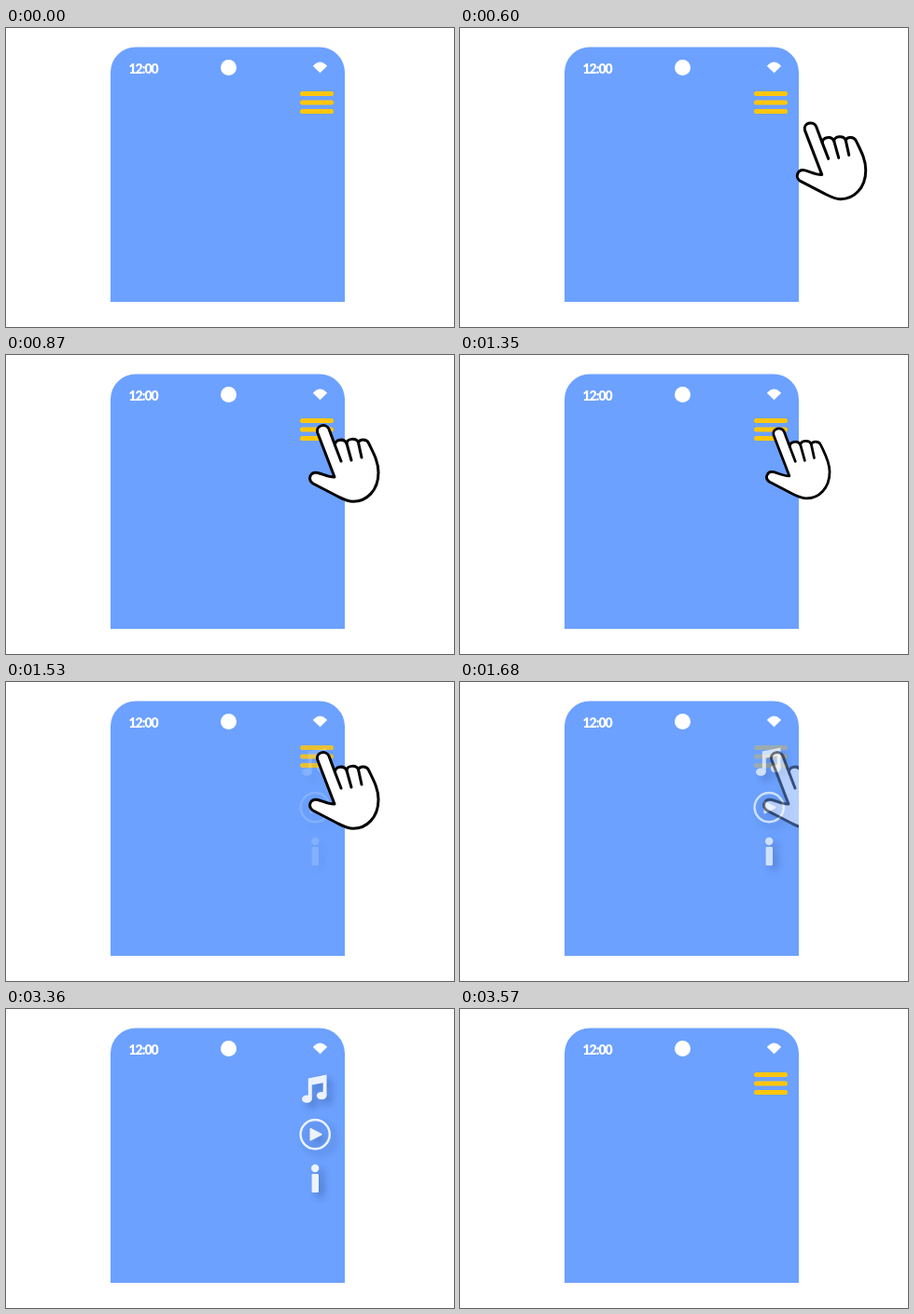
These frames come from a looping animation (480 by 321 pixels, 3.81 s). An HTML page:

```html
<!DOCTYPE html>
<html lang="en">
<head>
<meta charset="utf-8">
<title>Phone menu</title>
<style>
  html, body { margin: 0; width: 100%; height: 100%; overflow: hidden; background: #fff; }
  svg { display: block; width: 100vw; height: 100vh; }
  .time { font: 900 14px Lato, sans-serif; letter-spacing: -1px; fill: #fff; }
  #icons { fill: #fff; filter: drop-shadow(5px 5px 4px rgba(25, 45, 100, .42)); }
  #hand { fill: #fff; stroke: #000; stroke-width: 3; stroke-linecap: round; stroke-linejoin: round; }
</style>
</head>
<body>
<svg viewBox="0 0 480 321">
  <defs>
    <path id="body" d="M112 294V47.5A27 27 0 0 1 139 20.5H336A27 27 0 0 1 363 47.5V294Z"/>
    <clipPath id="screen"><use href="#body"/></clipPath>
    <g id="hand">
      <path d="M352 131L333.8 83.5C331.5 75.5 343 72.5 346 79.5L352.5 97
        C352 91 362 88.5 365 95C365 89.5 375.5 88.5 377.5 94C379 90 386.5 90 388.5 94.5
        C393 104 399 114 399 126C399 146 386 157.3 372 157.3C365 157 360 154 354 151
        L329 138C322.5 134 326 124.5 334 126.5C340 128 346 131.5 352 131Z"/>
      <path fill="none" d="M352.5 97L359 114M365 95L370 113M377.5 94L381 110"/>
    </g>
  </defs>

  <use id="handBack" class="hand" href="#hand"/>
  <use href="#body" fill="#6ca1ff"/>
  <text class="time" x="131.5" y="49">12:00</text>
  <circle cx="238.5" cy="42.5" r="8.5" fill="#fff"/>
  <path d="M336.5 47.8L329.3 40.8Q336.5 33 343.7 40.8Z" fill="#fff" stroke="#fff" stroke-linejoin="round"/>

  <g id="menu" fill="#ffc60b">
    <rect x="315" y="68" width="36" height="5" rx="2.5"/>
    <rect x="315" y="77.5" width="36" height="5" rx="2.5"/>
    <rect x="315" y="87" width="36" height="5" rx="2.5"/>
  </g>

  <g id="icons">
    <path d="M323.8 74.5L343.5 70.5V93H339.7V79.2L327.8 81.6V97H323.8Z"/>
    <ellipse cx="322.4" cy="96.7" rx="5.4" ry="4.1"/>
    <ellipse cx="338.2" cy="93" rx="5.3" ry="4.1"/>
    <circle cx="331.2" cy="134.6" r="15.6" fill="none" stroke="#fff" stroke-width="2.4"/>
    <path d="M326.5 128.8L337.6 134.6L326.5 140.4Z" stroke="#fff" stroke-width="2" stroke-linejoin="round"/>
    <circle cx="331.2" cy="171" r="4.2"/>
    <rect x="327.6" y="177" width="7.4" height="20" rx="1.2"/>
  </g>

  <g clip-path="url(#screen)"><use id="handFront" class="hand" href="#hand"/></g>
</svg>
<script>
  const LOOP = 3810, STEP = 30;
  const $ = id => document.getElementById(id);
  const menu = $('menu'), icons = $('icons'), back = $('handBack'), front = $('handFront');

  const ramp = (t, from, to) => Math.min(1, Math.max(0, (t - from) / (to - from)));
  const smooth = p => p * p * (3 - 2 * p);

  function draw(t) {
    const open = ramp(t, 1485, 1770);
    icons.setAttribute('opacity', open * (1 - ramp(t, 3330, 3570)));
    menu.setAttribute('opacity', 1 - open + ramp(t, 3360, 3570));

    // The hand slides in, presses, then fades away.
    const left = (1 - ramp(t, 570, 870)) ** 2.4;
    const press = smooth(ramp(t, 1240, 1385)) - smooth(ramp(t, 1385, 1530));
    const scale = 1 - 0.095 * press;
    const alpha = t < 570 ? 0 : 1 - ramp(t, 1530, 1830);
    const move = `translate(${362.5 + 46 * left} ${116.5 + 34 * left}) scale(${scale}) translate(-362.5 -116.5)`;
    for (const el of [back, front]) el.setAttribute('transform', move);
    front.setAttribute('opacity', alpha);
    // Beyond the phone the hand has a hard cut-off instead of a fade.
    back.setAttribute('opacity', alpha > 0.5 ? 1 : 0);
  }

  const start = performance.now();
  function tick() {
    const t = (performance.now() - start) % LOOP;
    draw(Math.floor(t / STEP) * STEP);
    requestAnimationFrame(tick);
  }
  tick();
</script>
</body>
</html>
```
